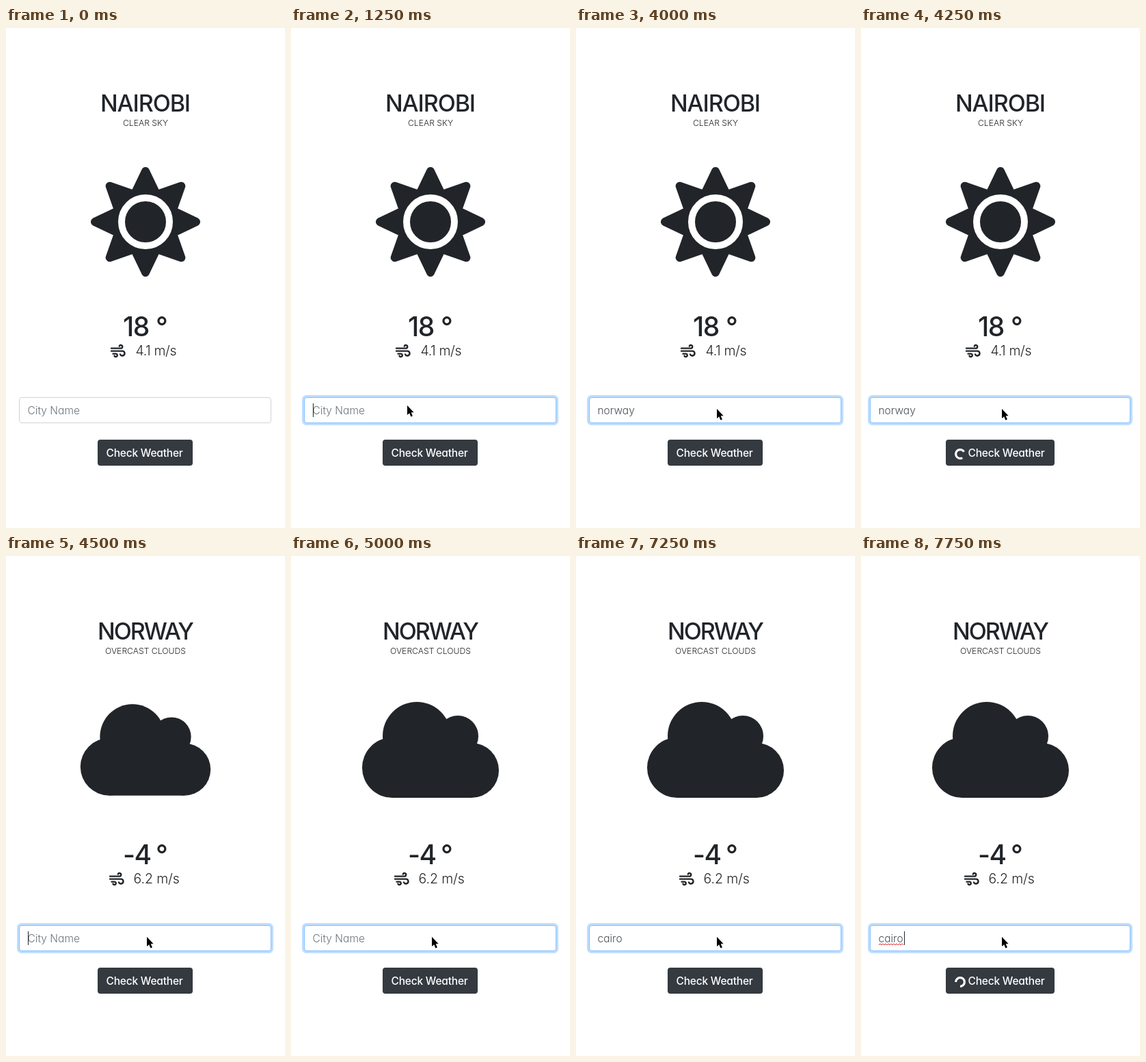
Recreate the animation shown at these times as an HTML page. Size 408 by 730 pixels, loop 8000 ms.

```html
<!DOCTYPE html>
<html lang="en">
<head>
<meta charset="utf-8">
<title>Weather</title>
<style>
  html, body { margin: 0; width: 100%; height: 100%; overflow: hidden; background: #fff; }
  svg { display: block; width: 408px; height: 730px; fill: #212529; }
  text { font-family: Inter, Lato, sans-serif; font-feature-settings: "cv11"; white-space: pre; }
  .mid { text-anchor: middle; }
  .city { font-size: 34px; font-weight: 500; }
  .sky { font-size: 12.2px; font-weight: 300; }
  .temp { font-size: 39px; font-weight: 500; letter-spacing: -1.5px; }
  .wind { font-size: 19.5px; font-weight: 300; }
  .field { font-size: 15.5px; font-weight: 300; }
  .label { font-size: 15.5px; font-weight: 500; letter-spacing: -.2px; fill: #fff; }
  .line { fill: none; stroke: #212529; stroke-width: 2.4; stroke-linecap: round; }
  .box { fill: #fff; stroke: #ced4da; }
  .ring { fill: #bfdeff; }
  .focus .box { stroke: #80bdff; }
  svg:not(.focus) .ring { display: none; }
</style>
</head>
<body>
<svg viewBox="0 0 408 730">
  <text id="city" class="city mid" y="122"></text>
  <text id="sky" class="sky mid" x="204" y="143"></text>

  <g id="sun">
    <path id="rays" stroke="#212529" stroke-width="12" stroke-linejoin="round"/>
    <circle cx="204" cy="283" r="35" stroke="#fff" stroke-width="10"/>
  </g>
  <g id="cloud">
    <circle cx="148" cy="309" r="44"/>
    <circle cx="264" cy="313" r="40"/>
    <circle cx="184" cy="263" r="50"/>
    <circle cx="244" cy="263" r="30"/>
    <path d="M148 265H264V353H148z"/>
  </g>

  <text id="temp" class="temp" x="171" y="450"></text>
  <text class="temp" x="219" y="450">°</text>
  <g id="gust" class="line">
    <path d="M154 467.6H168a2.3 2.3 0 1 0-2.2-3.1"/>
    <path d="M154 471.6H170a3.4 3.4 0 1 1-3 4.8"/>
    <path d="M156.5 475.6H160.5a2.2 2.2 0 1 1-2 3"/>
  </g>
  <text id="wind" class="wind" y="478"></text>

  <rect id="ring" class="ring" y="536" height="44" rx="6.5"/>
  <rect id="box" class="box" y="539.5" height="37" rx="3.5"/>
  <g id="entry">
    <text id="field" class="field" x="31.5" y="564"></text>
    <path id="squiggle" fill="none" stroke="#e0302f"/>
    <rect id="caret" y="548" width="1" height="20"/>
  </g>

  <rect id="button" y="601" height="38" rx="4" fill="#343a40"/>
  <path id="spinner" fill="none" stroke="#fff" stroke-width="3.2" d="M4.53 4.53A6.4 6.4 0 1 1 4.53 -4.53"/>
  <text id="label" class="label" y="626">Check Weather</text>

  <path id="pointer" fill="#000" stroke="#fff" stroke-width="1" paint-order="stroke"
        d="M0 0V14L3.2 11.2 5.4 16.6 7.9 15.6 5.7 10.2H9.6z"/>
</svg>
<script>
const LOOP = 8000, TICK = 250;
const $ = id => document.getElementById(id);
const svg = document.querySelector('svg');

const nairobi = { city: 'NAIROBI', cityX: 203.5, track: -1.1, sky: 'CLEAR SKY',
  temp: '18', wind: '4.1 m/s', windX: 189.5, windTrack: -.4, gustX: 0, cloudy: false };
const norway = { city: 'NORWAY', cityX: 203.5, track: -2, sky: 'OVERCAST CLOUDS',
  temp: '-4', wind: '6.2 m/s', windX: 186.5, windTrack: -.1, gustX: -2, cloudy: true };

const type = (text, caret) => ({ text, caret });
const blink = caret => ({ caret });

// Each step overrides part of the state from its time on.
const steps = [
  [0, { ...nairobi, text: '', caret: 0, focus: false, pointer: null, busy: null, zoom: 1, misspelt: false }],
  [500, { pointer: [172, 578] }],
  [750, { pointer: [170, 551] }],
  [1250, { focus: true, caret: 32 }],
  [1500, { pointer: [206, 556] }],
  [1750, blink(0)],
  [2250, type('n', 41)],
  [2500, type('nor', 57)],
  [3000, blink(0)],
  [3250, type('norw', 70)],
  [3500, type('norway', 88)],
  [4000, blink(0)],
  [4250, { busy: 4220 }],
  [4500, { ...norway, ...type('', 32), busy: null, zoom: .952 }],
  [4750, { zoom: 1 }],
  [5000, blink(0)],
  [5500, blink(32)],
  [6000, type('c', 40)],
  [6250, type('cai', 53)],
  [6500, type('cair', 59)],
  [6750, type('cairo', 69)],
  [7250, blink(0)],
  [7500, { busy: 7470 }],
  [7750, { caret: 69, misspelt: true }]
];

const set = (id, attrs) => {
  for (const k in attrs) $(id).setAttribute(k, attrs[k]);
};
const show = (id, on) => { $(id).style.display = on ? '' : 'none'; };

const points = Array.from({ length: 16 }, (_, i) => {
  const r = i % 2 ? 43 : 74, a = i * Math.PI / 8;
  return `${204 + r * Math.sin(a)} ${283 - r * Math.cos(a)}`;
});
set('rays', { d: `M${points.join('L')}z` });
set('squiggle', { d: 'M32 568' + 'l2-2 2 2'.repeat(9) });

function draw(t) {
  const s = Object.assign({}, ...steps.filter(([at]) => at <= t).map(([, patch]) => patch));
  const busy = s.busy !== null;

  $('city').textContent = s.city;
  set('city', { x: s.cityX, 'letter-spacing': s.track });
  $('sky').textContent = s.sky;
  $('temp').textContent = s.temp;
  $('wind').textContent = s.wind;
  set('wind', { x: s.windX, 'letter-spacing': s.windTrack });
  set('gust', { transform: `translate(${s.gustX})` });
  show('sun', !s.cloudy);
  show('cloud', s.cloudy);
  set('cloud', { transform: `translate(204 283) scale(${s.zoom}) translate(-204 -283)` });

  const left = busy ? 13 : 19, width = busy ? 381 : 369;
  svg.classList.toggle('focus', s.focus);
  set('ring', { x: left - 3, width: width + 6 });
  set('box', { x: left + .5, width: width - 1 });
  set('entry', { transform: `translate(${left - 19})` });
  $('field').textContent = s.text || 'City Name';
  set('field', { fill: s.text ? '#495057' : '#6c757d' });
  set('caret', { x: s.caret });
  show('caret', s.caret);
  show('squiggle', s.misspelt);

  set('button', { x: busy ? 124 : 134, width: busy ? 159 : 139 });
  set('label', { x: busy ? 156.5 : 146.5 });
  show('spinner', busy);
  if (busy) set('spinner', { transform: `translate(145 622) rotate(${(t - s.busy) * 360 / 750})` });

  show('pointer', s.pointer);
  if (s.pointer) set('pointer', { transform: `translate(${s.pointer})` });
}

let last = -1;
function frame() {
  const t = Math.floor(performance.now() % LOOP / TICK) * TICK;
  if (t !== last) draw(last = t);
  requestAnimationFrame(frame);
}
frame();
</script>
</body>
</html>
```
